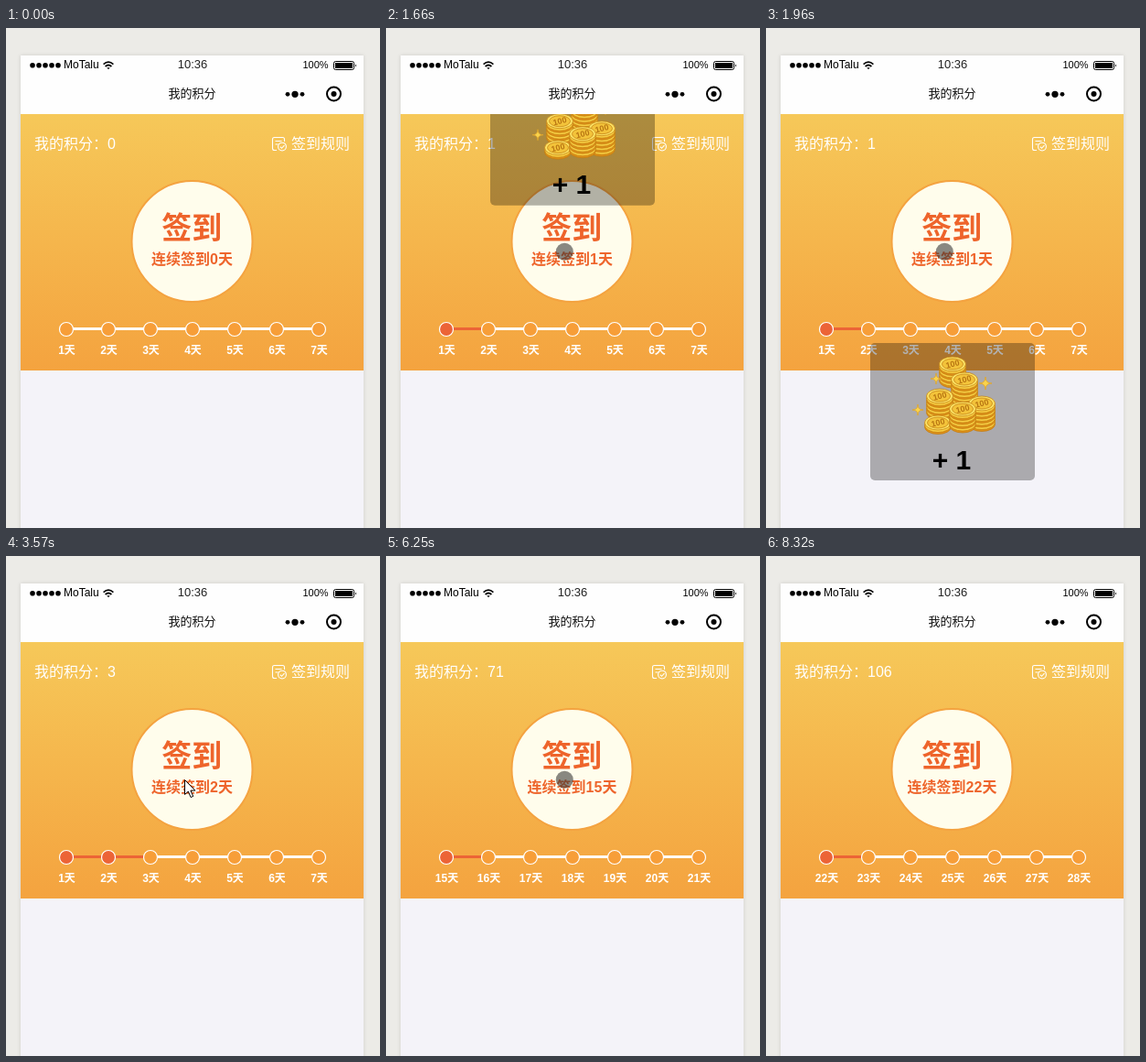
An HTML page that plays this animation: 409x546 px, repeating every 8.97 s.

```html
<!DOCTYPE html>
<html lang="zh-CN">
<head>
<meta charset="utf-8">
<title>我的积分</title>
<style>
  html, body { margin: 0; width: 100%; height: 100%; overflow: hidden; background: #ecebe7; }
  svg { display: block; width: 100%; height: 100%; }
  text { font-family: "Liberation Sans", "Noto Sans CJK SC", sans-serif; white-space: pre; }
  .mid { text-anchor: middle; }
  .bold { font-weight: 700; }
  #phone { filter: drop-shadow(0 0 2px rgba(0, 0, 0, .12)); }
</style>
</head>
<body>
<svg viewBox="0 0 409 546">
  <defs>
    <linearGradient id="sun" x2="0" y2="1">
      <stop stop-color="#f6c859"/>
      <stop offset="1" stop-color="#f4a33f"/>
    </linearGradient>
    <clipPath id="page"><path d="M16 94h375v452H16z"/></clipPath>
  </defs>

  <path id="phone" d="M16 30h375v530H16z" fill="#f4f3f9"/>
  <path d="M16 30h375v64H16z" fill="#fefefe"/>
  <path d="M16 94h375v280H16z" fill="url(#sun)"/>

  <!-- status bar -->
  <path d="M29 40.8h.01m6.99 0h.01m6.99 0h.01m6.99 0h.01m6.99 0h.01" stroke="#000" stroke-width="5.6" stroke-linecap="round"/>
  <text x="63" y="44" font-size="12">MoTalu</text>
  <g fill="none" stroke="#000" stroke-width="1.7">
    <path d="M106.6 39.6q5.4-4.8 10.8 0M108.6 42q3.4-3 6.8 0"/>
    <path d="M110.3 43.2h3.4L112 45.2z" fill="#000" stroke="none"/>
  </g>
  <text class="mid" x="204" y="44" font-size="13" fill="#222">10:36</text>
  <text x="324.5" y="44" font-size="11">100%</text>
  <rect x="358.5" y="36.5" width="22" height="9" rx="2" fill="none" stroke="#000"/>
  <path d="M360 38h19v6h-19zM382 39.5q2 1.5 0 3z"/>

  <!-- title bar -->
  <text class="mid" x="203.5" y="76" font-size="13" fill="#111">我的积分</text>
  <circle cx="308" cy="72.3" r="2.4"/>
  <circle cx="316" cy="72.3" r="3.6"/>
  <circle cx="324" cy="72.3" r="2.4"/>
  <circle cx="358.5" cy="72" r="7.5" fill="none" stroke="#000" stroke-width="2"/>
  <circle cx="358.5" cy="72" r="3"/>

  <!-- points and rules -->
  <g fill="#fff" font-size="16">
    <text id="points" x="31" y="132"></text>
    <text x="312" y="132">签到规则</text>
  </g>
  <g fill="none" stroke="#fff" stroke-width="1.1">
    <path d="M296 133.5h-2.5q-2 0-2-2v-10q0-2 2-2h9q2 0 2 2v2.5M294.5 123.5h7M294.5 127h3"/>
    <circle cx="302" cy="129.6" r="4.4"/>
    <path d="M299.8 129.6l1.7 1.7 3-3.2"/>
  </g>

  <!-- sign-in button -->
  <circle cx="203.5" cy="233" r="66" fill="#fffdec" stroke="#f4a340" stroke-width="2"/>
  <g class="mid bold" fill="#ee642b">
    <text x="203.3" y="229.5" font-size="33">签到</text>
    <text id="streak" x="203.5" y="258" font-size="16"></text>
  </g>

  <g id="track"></g>

  <g clip-path="url(#page)">
    <g id="popup">
      <rect width="180" height="150" rx="5" fill-opacity=".3"/>
      <g id="coins"></g>
      <text class="mid bold" x="89" y="137.5" font-size="30">+ 1</text>
    </g>
  </g>

  <circle id="touch" r="9.5" fill="#333" fill-opacity=".58"/>
  <path id="arrow" transform="translate(195.5 244.5)" d="M0 0V16l3.8-3.4L6.6 19l2.6-1.1-2.8-6.3h5z" fill="#fff" stroke="#000"/>
</svg>

<script>
const LOOP = 8970;
const SIGN_TIMES = [1480, 2950, 3630, 3810, 3990, 4140, 4290, 4470, 4970, 5090, 5270,
  5390, 5570, 5690, 6250, 6370, 6800, 6920, 7100, 7280, 7430, 7650];
const ARROW_SPANS = [[3570, 3630], [3750, 3810], [4350, 4470], [5090, 5150]];
const TODO = '#f79e38', DONE = '#ec6436';

const el = id => document.getElementById(id);
const show = (node, visible) => node.setAttribute('visibility', visible ? 'visible' : 'hidden');
const moveTo = (node, x, y) => node.setAttribute('transform', `translate(${x} ${y})`);
const lerp = (a, b, p) => a + (b - a) * p;

function add(parent, tag, attrs, text = '') {
  const node = document.createElementNS('http://www.w3.org/2000/svg', tag);
  for (const name in attrs) node.setAttribute(name, attrs[name]);
  node.textContent = text;
  return parent.appendChild(node);
}

// Seven days: links first, so that the dots cover their ends
const dayX = i => 66 + 46 * i;
const links = Array.from({ length: 6 }, (_, i) =>
  add(el('track'), 'path', { d: `M${dayX(i)} 328.5h46`, 'stroke-width': 3 }));
const dots = Array.from({ length: 7 }, (_, i) =>
  add(el('track'), 'circle', { cx: dayX(i), cy: 329, r: 7.5, stroke: '#fff', 'stroke-width': 1.2 }));
const labels = dots.map((_, i) =>
  add(el('track'), 'text', { x: dayX(i) + .5, y: 356, class: 'mid bold', 'font-size': 12, fill: '#fff' }));

function coinStack(x, y, layers) {
  const group = add(el('coins'), 'g', { transform: `translate(${x} ${y})` });
  const disc = (cy, fill, rx = 14.5, ry = 8) =>
    add(group, 'ellipse', { cy, rx, ry, fill, stroke: '#c07a10', 'stroke-width': .7 });
  for (let i = layers; i > 0; i--) {
    disc(i * 4.5, '#df9118');
    disc(i * 4.5 - 2, '#f8cf43');
  }
  disc(0, '#fbe264');
  disc(0, '#f3c33a', 11.5, 6);
  add(group, 'text', { class: 'mid bold', y: 3, 'font-size': 9, fill: '#b87512', transform: 'rotate(-14)' }, '100');
}

function sparkle(x, y, r) {
  add(el('coins'), 'path', {
    d: `M${x} ${y - r}Q${x} ${y} ${x + r} ${y}Q${x} ${y} ${x} ${y + r}Q${x} ${y} ${x - r} ${y}Q${x} ${y} ${x} ${y - r}`,
    fill: '#f9d34c', stroke: '#e0a52a', 'stroke-width': .8
  });
}

[[90, 23, 4], [103, 40, 5], [76, 58, 4], [122, 66, 5], [74, 87, 1], [101, 72, 4]].forEach(s => coinStack(...s));
[[72, 39, 6], [126, 44, 7], [52, 73, 6]].forEach(s => sparkle(...s));

function drawDays(days) {
  const first = 7 * Math.max(0, Math.floor((days - 1) / 7));
  const done = days - first;
  // Rewards are 1 to 6, and the seventh day pays 14
  const rest = days % 7;
  el('points').textContent = '我的积分：' + (35 * Math.floor(days / 7) + rest * (rest + 1) / 2);
  el('streak').textContent = `连续签到${days}天`;
  links.forEach((link, i) => link.setAttribute('stroke', i < done ? DONE : '#fff'));
  dots.forEach((dot, i) => dot.setAttribute('fill', i < done ? DONE : TODO));
  labels.forEach((label, i) => label.textContent = `${first + i + 1}天`);
}

function drawPopup(t) {
  const held = Math.floor((t - 1480) / 60) * 60 + 1480;
  const p = Math.min(1, Math.max(0, (held - 1515) / 445));
  show(el('popup'), held >= 1540 && t < 2450);
  moveTo(el('popup'), 114, lerp(-56, 344, p * p * (3 - 2 * p)));
}

function touchPosition(t) {
  if (t < 1060) {
    const p = Math.min(1, Math.floor((t - 460) / 55.7) / 7);
    const eased = 1 - (1 - p) ** 2;
    return [lerp(379, 202.5, eased), lerp(366, 266.5, eased)];
  }
  if (t < 1120) return [195, 246];
  if (t < 1310) return [198, 247];
  if (t < 8020) return [195.3, 244.3];
  const p = ((Math.floor((t - 8020) / 50) + 1) / 6) ** 1.5;
  return [lerp(195.3, 333, p), lerp(244.3, 537, p)];
}

function drawPointer(t) {
  const arrow = ARROW_SPANS.some(([from, to]) => t >= from && t < to);
  show(el('arrow'), arrow);
  show(el('touch'), !arrow && t >= 460 && t < 8320);
  moveTo(el('touch'), ...touchPosition(t));
}

function frame() {
  const t = performance.now() % LOOP;
  drawDays(SIGN_TIMES.filter(time => time <= t).length);
  drawPopup(t);
  drawPointer(t);
  requestAnimationFrame(frame);
}
frame();
</script>
</body>
</html>
```
